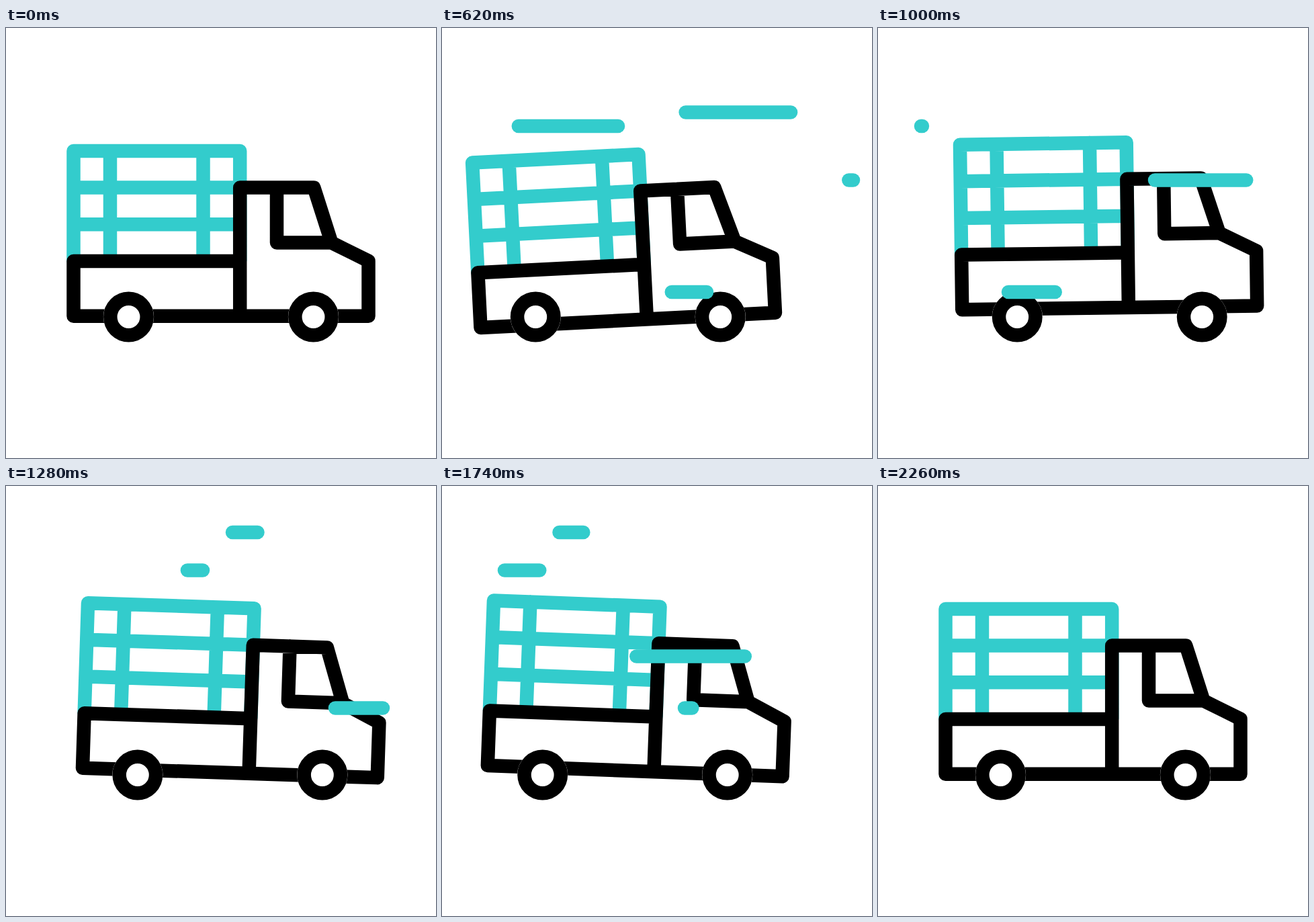
Animation, 640 px wide and 640 px high, one loop 2.4 s. Source, as an HTML page:

```html
<!DOCTYPE html>
<html lang="en">
<head>
<meta charset="utf-8">
<title>Truck</title>
<style>
html, body { margin: 0; width: 100%; height: 100%; overflow: hidden; background: #fff; }
svg { display: block; width: 100vw; height: 100vh; }
.line { fill: none; stroke-width: 20.5; stroke-linecap: round; stroke-linejoin: round; }
.teal { stroke: #33cccc; }
.black { stroke: #000; }
</style>
</head>
<body>
<svg viewBox="0 0 640 640">
  <g id="body">
    <path class="line teal" d="M100.5 346V183H348.2V346M155 183V346M293.5 183V346M100.5 237.5H348M100.5 292.3H348"/>
    <path class="line black" d="M348.2 347H100.5V428.7H539.5V346.8L484.5 319.5L458.3 237.5H348.2V428.7M403 237.5V319.5H484.5"/>
  </g>
  <g id="wheels">
    <g id="wheel">
      <circle cx="182.5" cy="430" r="37.6" fill="#fff"/>
      <circle class="line black" cx="182.5" cy="430" r="27.2"/>
    </g>
    <use href="#wheel" x="275"/>
  </g>
  <g id="wind"></g>
</svg>
<script>
const LOOP = 2400;
const REACH = 200;   // distance each wind streak covers
const RUN = 430;     // time one end of a streak needs for it
const GAP = 265;     // how long the tail waits after the head

const byId = id => document.getElementById(id);
const body = byId("body"), wheels = byId("wheels"), wind = byId("wind");

function ease(s) {
  s = Math.min(1, Math.max(0, s));
  return s * s * (3 - 2 * s);
}

// Starts at zero, then eases to each [time, value] in turn
function track(...stops) {
  return t => {
    let t0 = 0, v = 0;
    for (const [t1, goal] of stops) {
      v += (goal - v) * ease((t - t0) / (t1 - t0));
      if (t < t1) break;
      t0 = t1;
    }
    return v;
  };
}

const shift = track([580, -44.6], [1100, 32], [1630, -37], [2160, 0]);
const lift = track([450, 10.6], [1065, -13], [1430, 4.7], [1890, -7.5], [2260, 0]);
const tilt = track([640, -2.9], [1516, 2.9], [2180, 0]);

// A streak grows leftwards from x, then its tail catches up
function streak(x, y, start) {
  const path = document.createElementNS("http://www.w3.org/2000/svg", "path");
  path.setAttribute("class", "line teal");
  wind.appendChild(path);
  return t => {
    const age = t - start;
    const on = age > 0 && age < GAP + RUN;
    const head = x - REACH * ease(age / RUN);
    const tail = x - REACH * ease((age - GAP) / RUN);
    path.setAttribute("d", on ? `M${tail} ${y}H${head - 0.01}` : "");
  };
}

const streaks = [
  streak(556, 125.4, 238),
  streak(264, 146, 331),
  streak(394, 393, 477),
  streak(612, 226.4, 574),
  streak(561, 330.5, 1108),
  streak(374.5, 69, 1162),
  streak(293, 125.4, 1190),
  streak(472, 253.4, 1389)
];

function draw(t) {
  const x = shift(t);
  body.setAttribute("transform", `translate(${x} ${lift(t)}) rotate(${tilt(t)} 320 429)`);
  wheels.setAttribute("transform", `translate(${x} 0)`);
  streaks.forEach(move => move(t));
}

const start = performance.now();
function tick(now) {
  draw(Math.max(0, now - start) % LOOP);
  requestAnimationFrame(tick);
}
draw(0);
requestAnimationFrame(tick);
</script>
</body>
</html>
```
